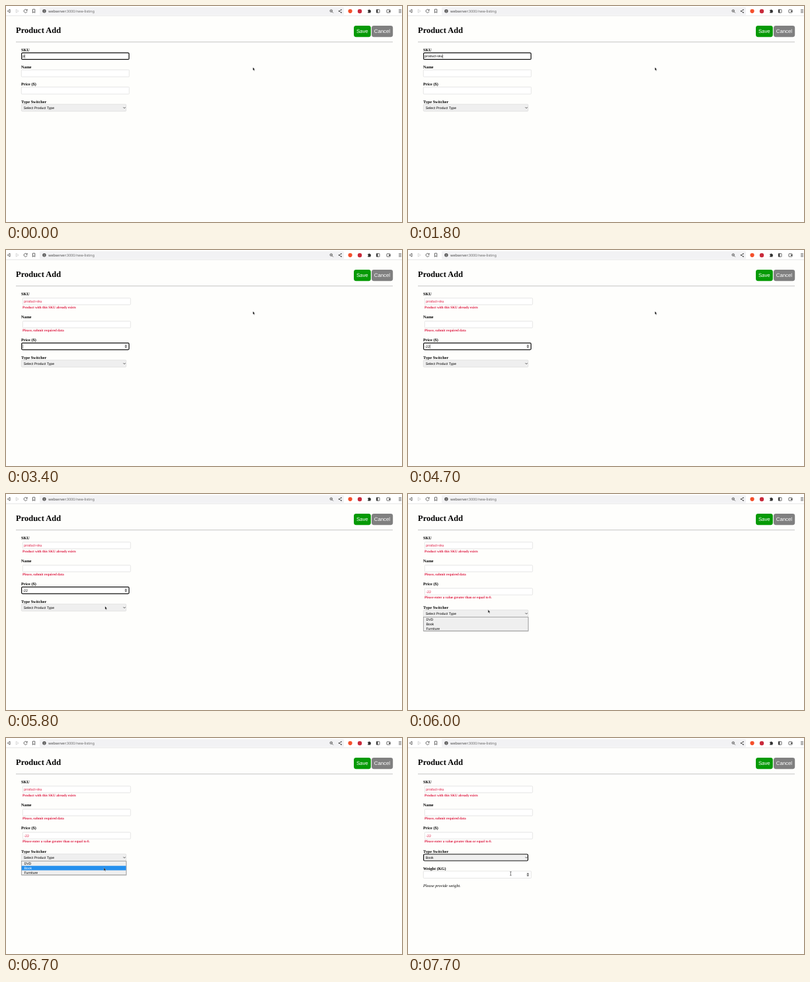
Write an HTML page that moves like this. It is 600 px wide and 329 px high and loops after 8000 ms.

```html
<!DOCTYPE html>
<html lang="en">
<head>
<meta charset="utf-8">
<title>Product Add</title>
<style>
html, body { margin: 0; width: 100%; height: 100%; overflow: hidden; background: #fefefc; }
svg { display: block; width: 100vw; height: 100vh; }
text { text-rendering: geometricPrecision; }
.title { font: bold 12.5px "Liberation Serif", serif; }
.label { font: bold 6.25px "Liberation Serif", serif; }
.error { font: bold 5.16px "Liberation Serif", serif; fill: #dc143c; }
.help { font: italic 6.25px "Liberation Serif", serif; }
.input { font: 5.2px "Liberation Sans", sans-serif; }
.button { font: 7.8px "Liberation Sans", sans-serif; fill: #fff; }
.url { font: 5.4px "Noto Sans", sans-serif; fill: #666; }
.icon { fill: none; stroke: #444; stroke-width: .8; stroke-linejoin: round; }
</style>
</head>
<body>
<svg viewBox="0 0 600 329" preserveAspectRatio="none">
  <rect width="600" height="329" fill="#fefefc"/>
  <rect width="600" height="15" fill="#fff"/>
  <rect x="51" y="1.8" width="461" height="12" rx="1.5" fill="#f2f2f4"/>
  <rect y="14.5" width="600" height=".7" fill="#dcdcdc"/>
  <g class="icon">
    <path d="M6 5.2L2.3 7.7L6 10.2Z"/>
    <path d="M15.3 5.2L19 7.7L15.3 10.2Z" stroke="#ccc"/>
    <path d="M31.6 6.2A2.5 2.5 0 1 0 32 8.4M32.2 4.8V6.8H30.2"/>
    <path d="M40.4 5H43.8V10.4L42.1 8.9L40.4 10.4Z"/>
    <circle cx="492.7" cy="7.4" r="1.8"/>
    <path d="M494.1 8.8L495.8 10.5M491.8 7.4H493.6"/>
    <path d="M508 5.7L504.5 7.8L508 9.9"/>
    <rect x="561.3" y="5.4" width="4.7" height="4.8" rx=".5"/>
    <rect x="576.9" y="5.7" width="5.2" height="4.4" rx=".6"/>
    <path d="M595 5.7H599M595 7.8H599M595 9.9H599"/>
  </g>
  <g fill="#333">
    <circle cx="508" cy="5.7" r=".8"/><circle cx="504.5" cy="7.8" r=".8"/><circle cx="508" cy="9.9" r=".8"/>
    <rect x="561.3" y="5.4" width="2" height="4.8"/>
    <rect x="580" y="7.1" width="2.2" height="1.6"/>
    <path d="M548.2 6H549.4A1 1 0 0 1 551.3 6H552.4V7.3A1 1 0 0 1 552.4 9.2V10.4H548.2V9.2A1 1 0 0 0 548.2 7.3Z"/>
    <circle cx="58" cy="7.8" r="2.7" fill="#555"/>
    <path d="M57.65 7.3H58.35V9.4H57.65ZM57.65 6H58.35V6.7H57.65Z" fill="#fff"/>
  </g>
  <circle cx="521.5" cy="7.8" r="3.1" fill="#f5502c"/>
  <circle cx="536" cy="8" r="3.2" fill="#c92b3c"/>
  <text class="url" x="64.2" y="9.8"><tspan fill="#444">webserver</tspan>:3000/new-listing</text>

  <text class="title" x="15" y="41">Product Add</text>
  <rect x="527" y="30" width="25.8" height="17.2" rx="3.4" fill="#069a06"/>
  <rect x="554" y="30" width="32.2" height="17.2" rx="3.4" fill="#808080"/>
  <text class="button" x="530.9" y="41.3">Save</text>
  <text class="button" x="557.8" y="41.3">Cancel</text>
  <rect x="15" y="54.4" width="571" height=".9" fill="#bdbdbd"/>
  <g id="form"></g>
  <g id="pointer"></g>
</svg>
<script>
const LOOP = 8000, FORM_TOP = 69;
const form = document.getElementById('form');
const pointer = document.getElementById('pointer');
const pen = document.createElement('canvas').getContext('2d');
pen.font = '100px "Liberation Sans", sans-serif';
const textWidth = s => pen.measureText(s).width * 0.052;

// Each step: start time and the properties that change from there on.
const steps = [
  [0, { focus: 'sku', caret: true, sku: 'p', name: '', price: '', type: 'Select Product Type',
        skuError: '', nameError: '', priceError: '', open: false, hover: '', weight: false, spin: false }],
  [100, { sku: 'pr' }],
  [200, { sku: 'pro' }],
  [400, { sku: 'prod' }],
  [500, { sku: 'produ' }],
  [700, { sku: 'produc' }],
  [900, { sku: 'product' }],
  [1100, { sku: 'product-' }],
  [1400, { sku: 'product-s' }],
  [1600, { sku: 'product-sk' }],
  [1800, { sku: 'product-sku' }],
  [2100, { focus: 'name', skuError: 'Product with this SKU already exists' }],
  [2700, { name: ' ' }],
  [2900, { name: '  ' }],
  [3000, { name: '   ' }],
  [3400, { focus: 'price', nameError: 'Please, submit required data' }],
  [4000, { price: '-' }],
  [4500, { price: '-2' }],
  [4700, { price: '-22' }],
  [5300, { caret: false }],
  [6000, { focus: '', open: true, priceError: 'Please enter a value greater than or equal to 0.' }],
  [6200, { hover: 'Book' }],
  [6300, { hover: 'Furniture' }],
  [6600, { hover: 'Book' }],
  [7200, { open: false, type: 'Book', focus: 'type', weight: true }],
  [7600, { spin: true }]
];

// Pointer stops: time, x, y.
const stops = [
  [0, 374, 93.4], [5500, 362, 97], [5600, 306, 117], [5700, 222, 148], [5800, 150, 171],
  [5900, 121.3, 176.3], [6100, 127, 183], [6200, 138, 194.5], [6300, 146, 202.5],
  [6400, 148.4, 202], [6600, 148.5, 200], [6700, 148.3, 197.6],
  [7500, 152, 201], [7600, 154.5, 204], [7700, 155.6, 206.5]
];

const text = (cls, x, y, s, extra = '') => `<text class="${cls}" x="${x}" y="${y}" ${extra}>${s}</text>`;

function box(x, y, w, h, fill, focused) {
  const line = focused ? 1.2 : 0.6, inset = line / 2;
  return `<rect x="${x + inset}" y="${y + inset}" width="${w - line}" height="${h - line}" rx="${focused ? 1.5 : 1}"
    fill="${fill}" stroke="${focused ? '#101010' : '#d6d6d6'}" stroke-width="${line}"/>`;
}

const spinner = y => `<rect x="179.3" y="${y + 2.2}" width="4.6" height="6.8" fill="#efefef"/>
  <path d="M180 ${y + 5.1}L181.6 ${y + 3.1}L183.2 ${y + 5.1}ZM180 ${y + 6.2}L181.6 ${y + 8.2}L183.2 ${y + 6.2}Z" fill="#444"/>`;

function field(y, label, value, { error, focused, caret, spin }) {
  const x = error ? 25 : 23, top = y + (error ? 3.9 : 1.7);
  let out = text('label', 23, y, label) + box(x, top, 164, error ? 10.8 : 11.3, '#fff', focused);
  out += text('input', x + 2.3, top + 7.4, value, error ? 'fill="#dc143c"' : '');
  if (focused && caret) {
    out += `<rect x="${x + 2.4 + textWidth(value)}" y="${top + 2.6}" width=".5" height="6.2"/>`;
  }
  if (spin) out += spinner(top);
  if (error) out += text('error', 25, y + 19.9, error);
  return out;
}

function dropdown(y, hover) {
  let out = `<rect x="23.4" y="${y + .5}" width="159.4" height="21.6" fill="#000" opacity=".18"/>
    <rect x="23.3" y="${y}" width="158.8" height="21" fill="#efefef" stroke="#8c8c8c" stroke-width=".7"/>`;
  ['DVD', 'Book', 'Furniture'].forEach((name, i) => {
    const top = y + .4 + i * 6.8, on = name === hover;
    if (on) out += `<rect x="23.6" y="${top}" width="158.2" height="6.8" fill="#2590ee"/>`;
    out += text('input', 27.4, top + 5.2, name, on ? 'fill="#fff"' : '');
  });
  return out;
}

function drawForm(s) {
  let y = FORM_TOP, out = '';
  for (const [key, label] of [['sku', 'SKU'], ['name', 'Name'], ['price', 'Price ($)']]) {
    const error = s[key + 'Error'], focused = s.focus === key;
    out += field(y, label, s[key], { error, focused, caret: s.caret, spin: focused && key === 'price' });
    y += error ? 35.2 : 26.2;
  }
  out += text('label', 23, y, 'Type Switcher');
  out += box(23, y + 1.8, 159.3, 11.2, '#efefef', s.focus === 'type');
  out += text('input', 26.8, y + 9.2, s.type);
  out += `<path d="M177.8 ${y + 6.6}L179.4 ${y + 8.2}L181 ${y + 6.6}" fill="none" stroke="#222" stroke-width=".8"/>`;
  if (s.weight) {
    out += field(y + 26.2, 'Weight (KG)', '', { spin: s.spin });
    out += text('help', 23, y + 52.6, 'Please provide weight.');
  }
  if (s.open) out += dropdown(y + 12.9, s.hover);
  form.innerHTML = out;
}

const ARROW = '<path d="M0 0V4.7L1.1 3.7L1.9 5.5L2.7 5.1L1.9 3.4H3.3Z" fill="#111" stroke="#fff" stroke-width=".3"/>';
const BEAM = '<path d="M-1.2 -2.7H1.2M0 -2.7V2.7M-1.2 2.7H1.2" fill="none" stroke="#333" stroke-width=".6"/>';

let shownStep = -1, shownStop = -1;
function frame(now) {
  const t = now % LOOP;
  const step = steps.findLastIndex(([at]) => at <= t);
  const stop = stops.findLastIndex(([at]) => at <= t);
  if (step !== shownStep) {
    drawForm(Object.assign({}, ...steps.slice(0, step + 1).map(([, change]) => change)));
    shownStep = step;
  }
  if (stop !== shownStop) {
    const [at, x, y] = stops[stop];
    pointer.innerHTML = at >= 7600 ? BEAM : ARROW;
    pointer.setAttribute('transform', `translate(${x} ${y})`);
    shownStop = stop;
  }
}

const start = performance.now();
function tick() {
  frame(performance.now() - start);
  requestAnimationFrame(tick);
}
tick();
</script>
</body>
</html>
```
